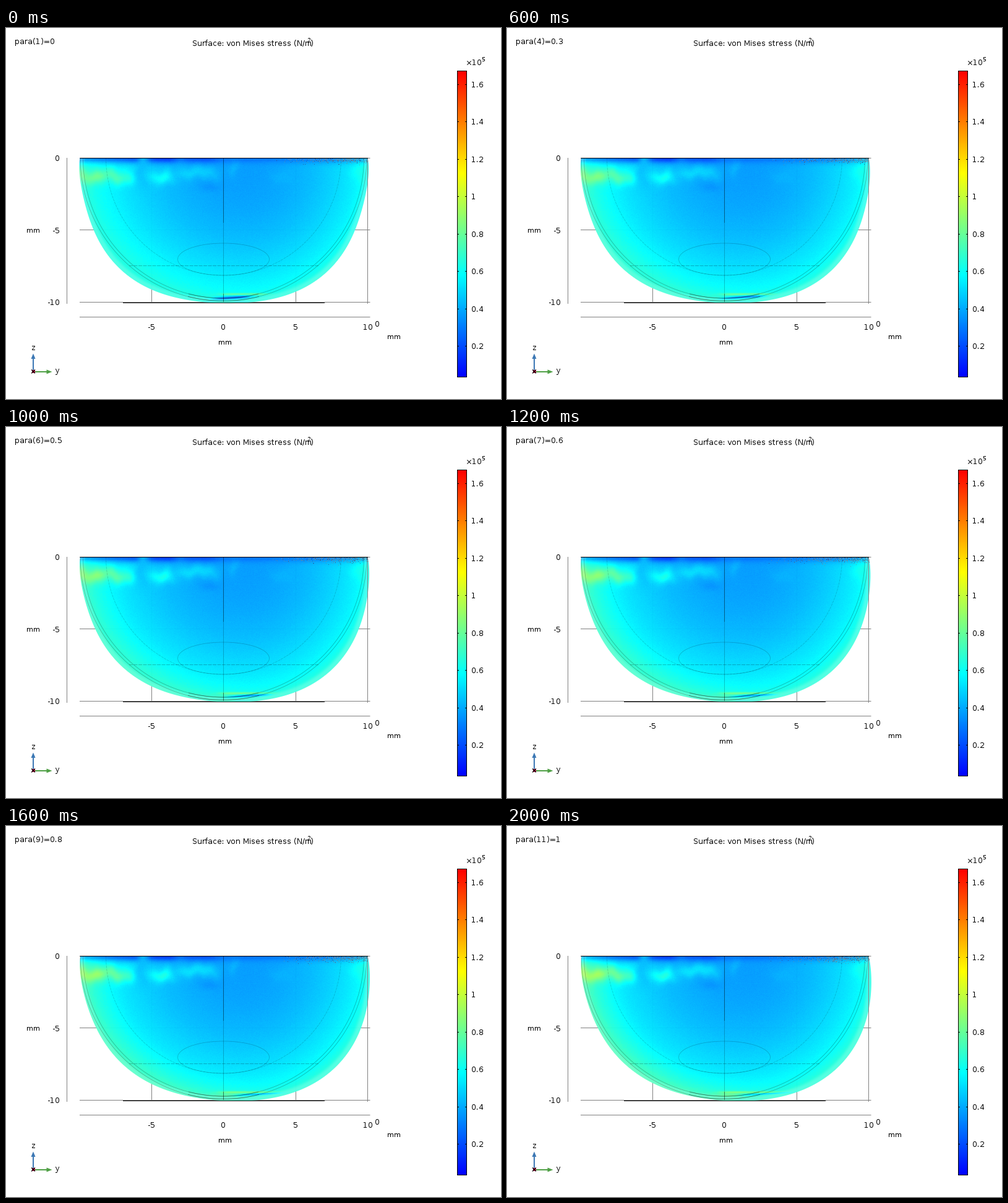
Recreate the animation shown at these times as a matplotlib script. Size 800 by 600 pixels, loop 2200 ms.

```python
import matplotlib.pyplot as plt
import numpy as np
from matplotlib.animation import FuncAnimation
from matplotlib.colors import LinearSegmentedColormap
from matplotlib.patches import Polygon, Rectangle

# Whole-pixel letter spacing
plt.rcParams["text.hinting"] = "native"
plt.rcParams["text.hinting_factor"] = 1

W, H, DPI = 800, 600, 100
STEPS = 11
PX = 72 / DPI
CX, CY = 351.5, 210
GREY = "#808080"

rainbow = LinearSegmentedColormap.from_list(
    "rainbow", ["#0000ff", "#00ffff", "#ffff00", "#ff0000"], N=512)

fig = plt.figure(figsize=(W / DPI, H / DPI), dpi=DPI, facecolor="white")
ax = fig.add_axes([0, 0, 1, 1])
ax.axis("off")


def line(x, y, color=GREY, width=1.0, z=1, **kw):
    kw.setdefault("solid_capstyle", "butt")
    return ax.plot(x, y, color=color, lw=width * PX, zorder=z, snap=False, **kw)[0]


def label(x, baseline, text, size=12, ha="left"):
    return ax.text(x, baseline, text, fontsize=size * PX, ha=ha, va="baseline",
                   family="DejaVu Sans", color="black", zorder=10)


# Body outline: radius about the top centre, every 15 degrees from left to right
ANGLES = np.linspace(0, 1, 13)
REST = [232, 235, 241, 244.5, 243.5, 238, 234, 239.5, 248, 247, 244, 237, 233]
LOADED = [231, 233, 236.5, 237, 236, 234.5, 234, 239.5, 252, 257, 254, 245, 233]
REST_FIT = np.polyfit(ANGLES, REST, 8)
LOADED_FIT = np.polyfit(ANGLES, LOADED, 8)

X0, X1, Y0, Y1 = 110, 600, 210, 450
gx, gy = np.meshgrid(np.arange(X0, X1) + 0.5, np.arange(Y0, Y1) + 0.5)
radius = np.hypot(gx - CX, gy - CY)
turn = np.arctan2(gy - CY, CX - gx) / np.pi
grain = np.random.default_rng(4).normal(0, 1, gx.shape)

# Wavy coordinates give the stress spots uneven borders
wx = gx + 3 * np.sin(gy / 6)
wy = gy + 2 * np.sin(gx / 8) + 1.2 * np.sin(gx / 3.7)


def ramp(v, lo, hi):
    t = np.clip((v - lo) / (hi - lo), 0, 1)
    return t * t * (3 - 2 * t)


def spot(cx, cy, sx, sy, flat=2):
    return np.exp(-np.abs((wx - cx) / sx) ** flat - ((wy - cy) / sy) ** 2)


def stress(p, rho):
    dx = gx - 385
    q = np.hypot(np.where(dx < 0, dx / 262, dx / 222), (gy - 230) / 220)
    v = 0.205 + 0.125 * (q / 0.86) ** 2
    v = np.minimum(v, 0.36) + 0.015 * ramp(rho, 0.9, 1)
    side = 1 - 0.8 * ramp(gx, 330, 480)
    v += 0.05 * p * side * ramp(q, 0.75, 1.05)

    # shadow under the top edge
    depth = 0.12 * (1 - ramp(gx, 205, 232)) + 0.06
    depth += 0.12 * np.exp(-((gx - 252) / 24) ** 4)
    depth += 0.06 * np.exp(-((gx - 311) / 30) ** 4)
    depth += 0.05 * ramp(gx, 430, 560)
    depth -= 0.07 * np.exp(-((gx - 220) / 8) ** 2)
    v -= depth * np.exp(-((gy - 210) / 8.5) ** 2)

    # hot and cool spots along the upper band
    ripple = 1 + 0.12 * np.sin(gx / 4.5) + 0.08 * np.sin(gx / 9 + gy / 5)
    v += (0.11 + 0.035 * p) * ripple * spot(161, 240, 47, 12, 6)
    v += (0.09 + 0.03 * p) * ripple * spot(253, 242, 19, 11)
    v += (0.05 + 0.025 * p) * spot(313, 234, 33, 10, 4)
    v += 0.025 * spot(368, 228, 8, 14)
    v += 0.015 * ripple * spot(446, 241, 16, 10)
    v += 0.025 * spot(570, 234, 12, 17)
    v -= 0.025 * spot(217, 235, 11, 22)
    v -= 0.02 * spot(325, 257, 18, 8)

    # contact zone at the bottom
    v += 0.11 * np.exp(-((gx - 385 - 10 * p) / (38 + 12 * p)) ** 4
                       - ((gy - 430.5) / 1.8) ** 2)
    v += 0.07 * p * np.exp(-((gx - 360) / 22) ** 2 - ((gy - 434.5) / 4) ** 2)
    drop = 0.06 * (gx - 362)
    v -= (0.22 - 0.1 * p) * np.exp(
        -((gx - 365 - 52 * p) / (30 + 10 * p)) ** 4
        - ((gy - 436.5 + drop) / (2.6 - 1.4 * p)) ** 2)
    return v


def body(p):
    edge = (1 - p) * np.polyval(REST_FIT, turn) + p * np.polyval(LOADED_FIT, turn)
    rho = radius / edge
    rgba = rainbow(np.clip(stress(p, rho) + 0.004 * grain, 0, 1))
    rgb = rgba[..., :3]
    rgb += (1 - rgb) * 0.2 * ramp(rho, 0.955, 0.985)[..., None]

    # flickering speckle where surfaces overlap at the upper right
    rng = np.random.default_rng(20 + round(p * 10))
    chance = (0.6 * ramp(gx, 410, 580)
              * np.exp(-((gy - 212) / (4.5 + 1.5 * p)) ** 2))
    spots = rng.random(gx.shape) < chance
    tint = np.where(rng.random(gx.shape)[..., None] < 0.75,
                    [0.47, 0.52, 0.5], [0.2, 0.2, 0.45])
    rgb[spots] = 0.35 * rgb[spots] + 0.65 * tint[spots]

    rgba[..., 3] = np.clip(edge - radius + 0.5, 0, 1) * 0.98
    return rgba


def draw_grid():
    line([98.5, 98.5], [210, 446])
    line([119, 588.5], [467.5, 467.5])
    for y in (210.5, 326.5, 443.5):
        line([119, 588.5], [y, y])
    for x in (235.5, 351.5, 468.5):
        line([x, x], [210, 443])
    line([584.5, 584.5], [210, 446], z=4)
    line([189, 515], [444.5, 444.5], "black", z=4)
    line([119.5, 585], [210.5, 210.5], "black", z=4)


def draw_edges():
    t = np.linspace(0, np.pi, 300)
    low = np.linspace(0.42, 0.58, 80) * np.pi
    for r in (231.5, 227):
        line(CX + r * np.cos(t), CY + r * np.sin(t), "black", 0.8, 5, alpha=0.28)
        line(CX + r * np.cos(low), CY + r * np.sin(low), "black", 0.8, 5, alpha=0.4)
    line(CX + 190 * np.cos(t), CY + 190 * np.sin(t), "black", 0.8, 5,
         alpha=0.17, ls=(0, (5, 1.5)))
    line(CX + 74 * np.cos(2 * t), 374 + 26 * np.sin(2 * t), "black", 0.8, 5,
         alpha=0.2)
    line([199, 505], [384.5, 384.5], "black", 1, 5, alpha=0.24, ls=(0, (6, 1.5)))
    for top, end, alpha in ((210, 315, 0.45), (315, 430, 0.2), (430, 443, 0.5)):
        line([CX, CX], [top, end], "black", 1, 5, alpha=alpha)


def draw_colorbar():
    levels = np.linspace(1, 0, 496)[:, None]
    ax.imshow(levels, cmap=rainbow, extent=(729, 745, 565, 69), aspect="auto",
              interpolation="nearest", zorder=2)
    ax.add_patch(Rectangle((729.5, 69.5), 15, 495, fill=False, ec="black",
                           lw=PX, zorder=3, snap=False))
    for k in range(1, 9):
        value = 0.2 * k
        y = round(514 - (value - 0.2) * 302.1) + 0.5
        for x in (729, 742):
            line([x, x + 3], [y, y], "black", 1, z=4)
        label(752, y + 4.5, f"{value:g}")
    label(743, 60, "×10")
    label(769, 54, "5", 9)


def draw_triad():
    blue, green = "#3c78b4", "#50a046"
    line([44, 44], [555, 534], blue, 2, z=6)
    line([44, 67], [556, 556], green, 2, z=6)
    ax.add_patch(Polygon([(44, 526.5), (40.5, 535), (47.5, 535)], fc=blue, zorder=6))
    ax.add_patch(Polygon([(74.5, 556), (65.5, 552.5), (65.5, 559.5)], fc=green, zorder=6))
    ax.add_patch(Rectangle((41.5, 553), 5, 5, fc="#c81e50", zorder=7))
    for s in (-1, 1):
        line([41, 47], [555.5 - 3 * s, 555.5 + 3 * s], "black", 1.2, z=8)
    label(44, 521, "z", ha="center")
    label(79, 558, "y")


def draw_labels():
    label(301, 29, "Surface: von Mises stress (N/m")
    label(487, 23, "2", 9)
    label(492, 29, ")")
    for y, text in ((215, "0"), (332, "-5"), (448, "-10")):
        label(87, y, text, ha="right")
    for x, text in ((235, "-5"), (351.5, "0"), (468, "5"), (585, "10")):
        label(x, 488, text, ha="center")
    label(596, 483, "0")
    for x, y in ((44, 331), (354, 512), (627, 503)):
        label(x, y, "mm", 11, ha="center")


draw_grid()
draw_edges()
draw_colorbar()
draw_triad()
draw_labels()
surface = ax.imshow(body(0), extent=(X0, X1, Y1, Y0), aspect="auto",
                    interpolation="nearest", zorder=3)
caption = label(14, 26, "")
ax.set_xlim(0, W)
ax.set_ylim(H, 0)


def update(i):
    p = i / (STEPS - 1)
    surface.set_data(body(p))
    caption.set_text(f"para({i + 1})={p:g}")
    return surface, caption


anim = FuncAnimation(fig, update, frames=STEPS, interval=200, repeat=True,
                     repeat_delay=0)
plt.show()
```
